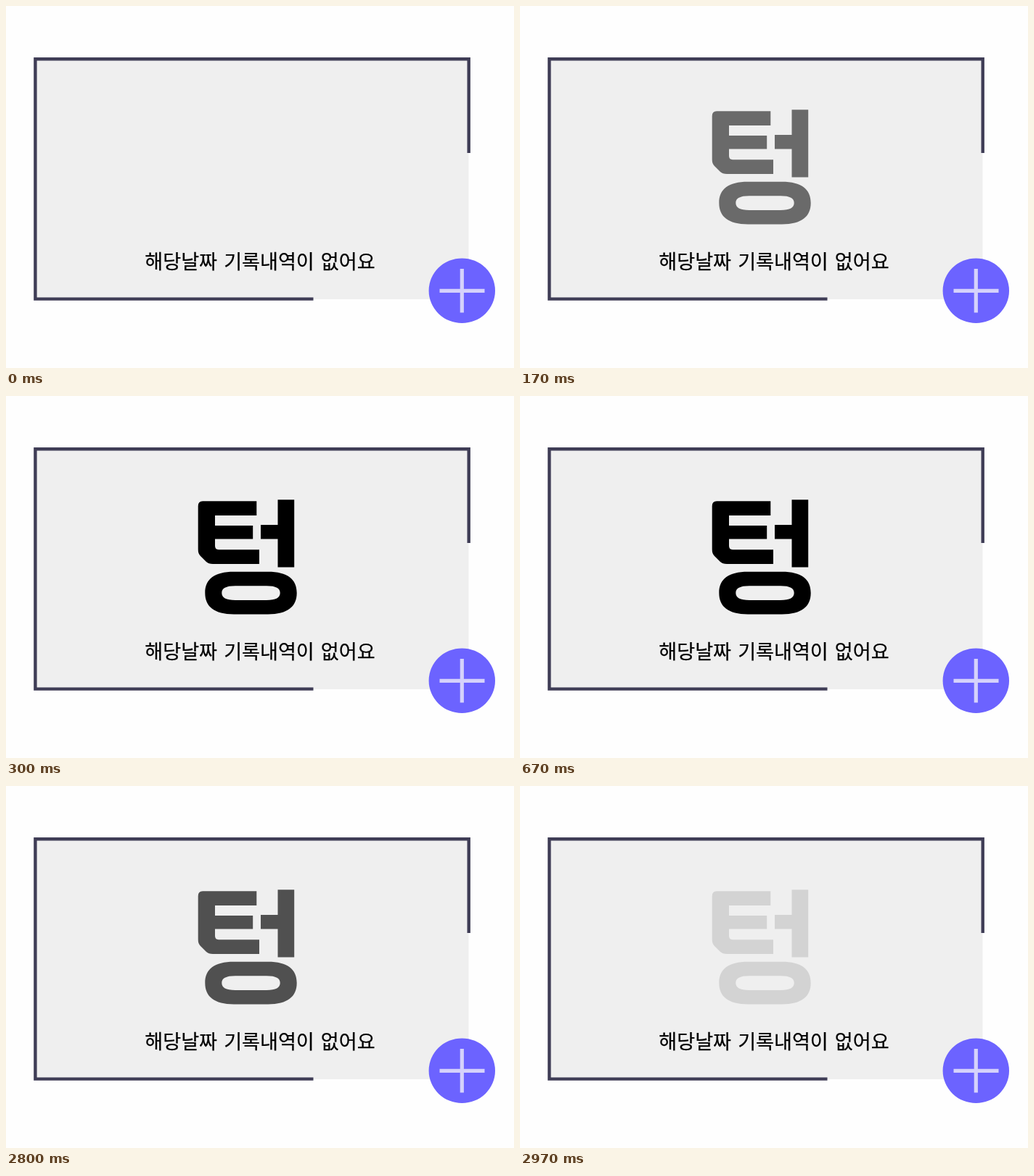
Animation of 700 by 500 pixels, one loop 3010 ms. Source, as an HTML page:

```html
<!DOCTYPE html>
<html lang="ko">
<head>
<meta charset="utf-8">
<title>텅</title>
<style>
  html, body { margin: 0; width: 100%; height: 100%; overflow: hidden; background: #fefefe; }
  svg { display: block; width: 700px; height: 500px; }
  .note {
    font: 400 27.1px "Noto Sans CJK KR", "Noto Sans CJK", "Noto Sans CJK JP", sans-serif;
    word-spacing: 1.5px;
    text-anchor: middle;
    stroke: #000;
    stroke-width: .25px;
  }
  /* Linear fades at 30 steps per second */
  .empty { animation: fade 3010ms -4ms infinite; }
  @keyframes fade {
    0% { opacity: 0; animation-timing-function: steps(9, end); }
    9.967% { opacity: 1; animation-timing-function: step-end; }
    89.701% { opacity: 1; animation-timing-function: steps(8, end); }
    98.56%, 100% { opacity: .1111; }
  }
</style>
</head>
<body>
<svg viewBox="0 0 700 500">
  <rect x="38" y="71" width="599.5" height="334" fill="#efefef"/>
  <path d="M423.5 404.6H40.4V73.2H637.7V203" fill="none" stroke="#3f3d56" stroke-width="4.4"/>

  <g class="empty" role="img" aria-label="텅">
    <path d="M271 145.2H345.3V165H288V179H340.2V197.4H288V207Q288 212.2 293 212.2H349V232H285Q279 232 276 229L267.5 220.5Q264.7 217.5 264.7 212V152Q264.7 145.2 271 145.2Z"/>
    <path d="M374.5 143.2H397.2V236.5H374.5V197.4H351V178H374.5Z"/>
    <path fill-rule="evenodd" d="M314 242.7H361C388 242.7 400.7 253 400.7 272S388 301.4 361 301.4H314C287 301.4 274.3 291 274.3 272S287 242.7 314 242.7ZM316 262.2C303 262.2 297.3 265.5 297.3 272S303 282 316 282H359C372 282 377.7 278.5 377.7 272S372 262.2 359 262.2Z"/>
  </g>

  <text class="note" x="350" y="363">해당날짜 기록내역이 없어요</text>

  <ellipse cx="628.3" cy="393.2" rx="45.7" ry="44.8" fill="#6c63ff"/>
  <path d="M597.5 393.3H659.5M628.3 363V423.5" stroke="#d5d2fb" stroke-width="5.2"/>
</svg>
</body>
</html>
```
